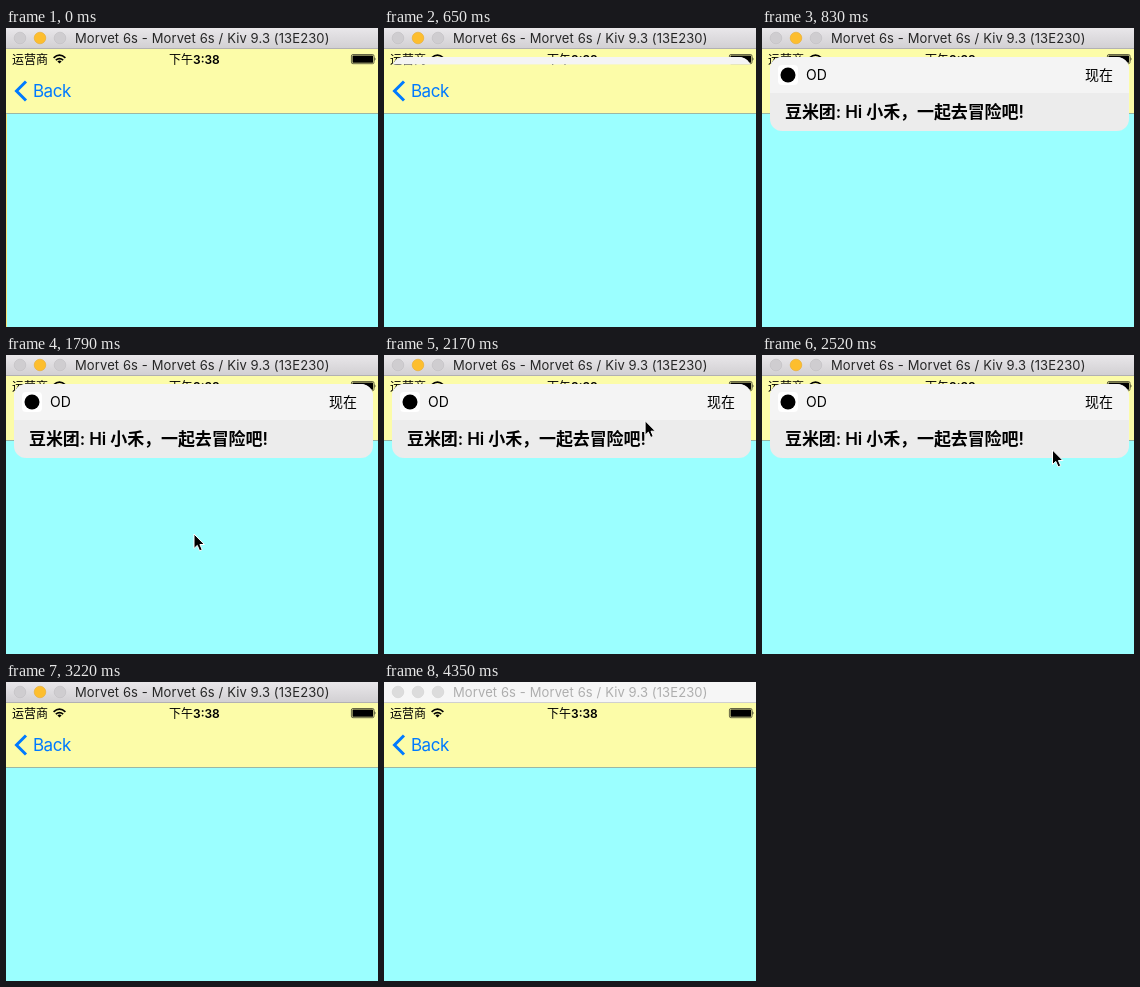
Recreate the animation shown at these times as an HTML page. Size 372 by 299 pixels, loop 4430 ms.

```html
<!DOCTYPE html>
<html lang="zh-CN">
<head>
<meta charset="utf-8">
<style>
html, body { margin: 0; width: 100%; height: 100%; overflow: hidden; background: #9bffff; }
svg { display: block; width: 372px; height: 299px; }
text { font-family: Inter, "Noto Sans CJK SC", "Noto Sans CJK", sans-serif; }
#title { font-size: 13px; letter-spacing: .11px; fill: #262626; }
#back { font-size: 17px; letter-spacing: -.5px; fill: #007aff; }
.status { font-size: 12px; font-weight: 500; }
.small { font-size: 14px; }
#message { font-size: 17px; font-weight: 600; letter-spacing: -.1px; }
.light { fill: #cfcdd0; stroke: #c0bec1; stroke-width: .6; }
#yellow { fill: #fdbe2e; stroke: #e8ac2c; }
.inactive #bar { fill: #f6f6f6; }
.inactive #barLine { fill: #d0d0d0; }
.inactive #title { fill: #aeaeae; }
.inactive .light, .inactive #yellow { fill: #dcdcdc; stroke: #d2d2d2; }
</style>
</head>
<body>
<svg id="stage" viewBox="0 0 372 299">
  <defs>
    <linearGradient id="metal" x2="0" y2="1">
      <stop stop-color="#e9e7ea"/><stop offset="1" stop-color="#d2d0d3"/>
    </linearGradient>
    <clipPath id="card"><rect x="8" y="29" width="359" height="74" rx="12"/></clipPath>
    <clipPath id="reveal"><rect id="window" x="8" y="29" width="359" height="74"/></clipPath>
  </defs>

  <rect width="372" height="299" fill="#9bffff"/>
  <rect id="edge" y="85" width="1" height="214" fill="#f3e27a"/>
  <rect y="20" width="372" height="65" fill="#fcfca8"/>
  <rect y="85" width="372" height="1" fill="#9ab8a6"/>
  <rect id="bar" width="372" height="20" fill="url(#metal)"/>
  <rect id="barLine" y="20" width="372" height="1" fill="#b2b1b2"/>
  <circle class="light" cx="14" cy="10" r="5.8"/>
  <circle class="light" id="yellow" cx="34" cy="10" r="5.8"/>
  <circle class="light" cx="54" cy="10" r="5.8"/>
  <text id="title" x="69" y="15">Morvet 6s - Morvet 6s / Kiv 9.3 (13E230)</text>

  <text class="status" x="6" y="35.5">运营商</text>
  <g fill="none" stroke="#000" stroke-width="1.7">
    <path d="M47.6 29.8Q53.5 24.6 59.4 29.8M49.8 32.2Q53.5 29 57.2 32.2"/>
    <path d="M51.4 33.4Q53.5 31.8 55.6 33.4L53.5 35.6Z" fill="#000" stroke="none"/>
  </g>
  <text class="status" x="163" y="35.5">下午<tspan font-weight="600">3:38</tspan></text>
  <rect x="345.4" y="26.5" width="22.6" height="9.2" rx="1.5" fill="none" stroke="#000" stroke-width=".6"/>
  <rect x="346.5" y="27.5" width="20.5" height="7.2" rx=".5"/>
  <path d="M368.6 29q1.8 2 0 4z"/>
  <path d="M20 53.5L10.5 63L20 72.5" fill="none" stroke="#007aff" stroke-width="3"/>
  <text id="back" x="27" y="69">Back</text>

  <g clip-path="url(#reveal)"><g clip-path="url(#card)">
    <rect x="8" y="29" width="359" height="74" fill="#ececec"/>
    <rect x="8" y="29" width="359" height="36" fill="#f4f4f4"/>
    <rect x="16" y="37" width="20" height="20" rx="4" fill="#fff"/>
    <circle cx="26" cy="47" r="7.5"/>
    <text class="small" x="44" y="52">OD</text>
    <text class="small" x="323" y="52">现在</text>
    <text id="message" x="23" y="90">豆米团: Hi 小禾，一起去冒险吧!</text>
  </g></g>

  <path id="cursor" d="M0 0V14.5L3.3 11.4L5.6 16.8L8.2 15.7L5.9 10.5H10.4Z" stroke="#fff" stroke-width="1"/>
</svg>
<script>
const LOOP = 4430;
const $ = id => document.getElementById(id);
const progress = (t, from, to) => Math.min(1, Math.max(0, (t - from) / (to - from)));
const ease = p => (1 - Math.cos(Math.PI * p)) / 2;

function bannerHeight(t) {
  if (t < 650 || t >= 3220) return 0;
  return 74 * (ease(progress(t, 605, 830)) - ease(progress(t, 3000, 3220)));
}

function cursorAt(t) {
  if (t < 1790) return null;
  if (t < 1820) return [188, 179];
  if (t < 1850) return [171, 48];
  if (t < 2000 || t >= 3220) return null;
  if (t < 2610) {
    const rest = 1 - progress(t, 2000, 2520);
    return [290.5 - 157 * rest ** 4.2, 95 - 95 * rest ** 2.95];
  }
  // flick upwards, off the top of the stage
  const flick = Math.max(0, (t - 2850) / 120) ** 1.5;
  return [291.5 - 8 * flick, 93 - 58.5 * flick];
}

function draw(now) {
  const t = now % LOOP;
  $("edge").setAttribute("opacity", t < 30 ? 1 : t < 60 ? .4 : 0);
  $("window").setAttribute("height", bannerHeight(t));
  $("stage").classList.toggle("inactive", t >= 4350);
  const at = cursorAt(t);
  $("cursor").setAttribute("visibility", at ? "visible" : "hidden");
  if (at) $("cursor").setAttribute("transform", `translate(${at})`);
}

const start = performance.now();
function tick() {
  draw(performance.now() - start);
  requestAnimationFrame(tick);
}
tick();
</script>
</body>
</html>
```
